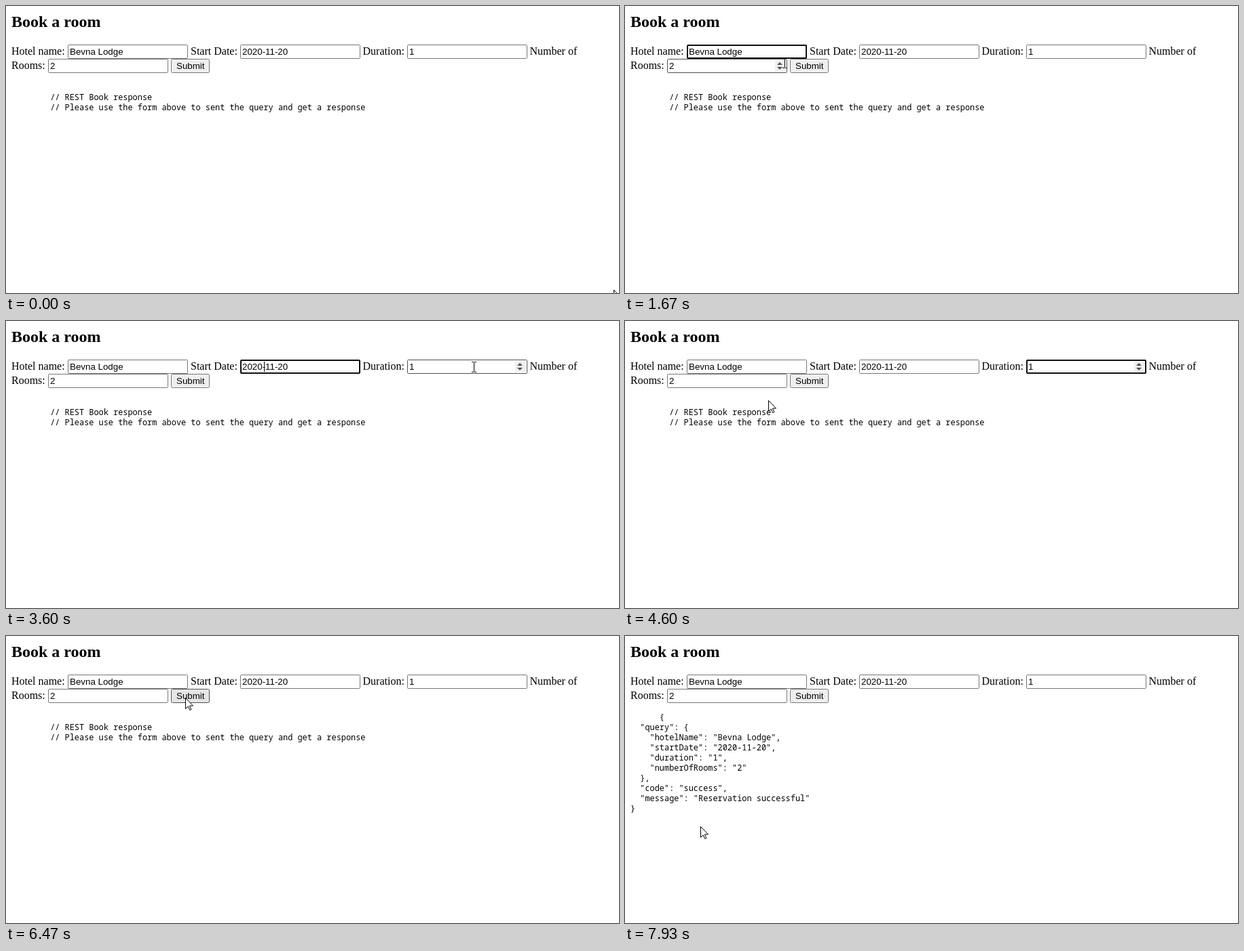
An HTML page for the animation above (8 s loop, 903 by 424 pixels).

```html
<!DOCTYPE html>
<html lang="en">
<head>
<meta charset="utf-8">
<title>Book a room</title>
<style>
  html, body { margin: 0; width: 100%; height: 100%; overflow: hidden; background: #fff; }
  svg { display: block; width: 903px; height: 424px; }
  text { white-space: pre; }
  .label { font: 16px "Liberation Serif", "Times New Roman", serif; }
  .title { font: bold 24px "Liberation Serif", "Times New Roman", serif; }
  .value { font: 13.333px "Liberation Sans", Arial, sans-serif; }
  .code { font: 11.92px "Noto Sans Mono", monospace; }
  .box { fill: #fff; stroke: #767676; }
  .hover .box { stroke: #4f4f4f; }
  .ring { fill: none; stroke: #101010; stroke-width: 2; visibility: hidden; }
  .focus .ring { visibility: visible; }
  .spin { visibility: hidden; }
  .hover .spin, .focus .spin { visibility: visible; }
  #button .box { fill: #efefef; }
  #button.hover .box { fill: #e5e5e5; }
  #button.active .box { fill: #f5f5f5; stroke: #8d8d8d; }
</style>
</head>
<body>
<svg viewBox="0 0 903 424">
  <text class="title" x="8" y="31">Book a room</text>
  <g class="label">
    <text x="8" y="72">Hotel name:</text>
    <text x="272" y="72">Start Date:</text>
    <text x="525.5" y="72">Duration:</text>
    <text x="771.5" y="72">Number of</text>
    <text x="8" y="93">Rooms:</text>
  </g>
  <g id="fields"></g>
  <g id="button">
    <rect class="box" x="243.5" y="78.5" width="56" height="20" rx="2"/>
    <text class="value" x="251" y="93">Submit</text>
  </g>
  <g id="hint" class="code"></g>
  <g id="reply" class="code"></g>
  <rect id="caret" width="1" height="15"/>
  <path id="arrow" d="M.5 .5V16.5L4.2 13l2.5 5.6 2.2-1L6.4 12.1h5.1z" fill="#fff" stroke="#000"/>
  <path id="beam" d="M-3-7.5H0M1-7.5H4M-3 7.5H0M1 7.5H4M.5-7V7" fill="none" stroke="#000"/>
</svg>
<script>
const $ = id => document.getElementById(id);
const LOOP = 8000, FPS = 15, W = 177, H = 21;

const fields = [
  { x: 91, y: 57, value: 'Bevna Lodge', caret: 133 },
  { x: 345, y: 57, value: '2020-11-20', caret: 380 },
  { x: 591, y: 57, value: '1', caret: 602, number: true },
  { x: 62, y: 78, value: '2', caret: 73, number: true }
];

const spinner = (x, y) => `<g class="spin">
  <rect x="${x}" y="${y}" width="15" height="15" fill="#efefef"/>
  <path d="M${x + 3} ${y + 6}l4-4 4 4zM${x + 3} ${y + 9}h8l-4 4z" fill="#505050"/></g>`;

$('fields').innerHTML = fields.map(f => `<g>
  <rect class="box" x="${f.x + .5}" y="${f.y + .5}" width="${W - 1}" height="${H - 1}" rx="1"/>
  <text class="value" x="${f.x + 3}" y="${f.y + 15}">${f.value}</text>
  ${f.number ? spinner(f.x + 159, f.y + 3) : ''}
  <rect class="ring" x="${f.x + 1}" y="${f.y + 1}" width="${W - 2}" height="${H - 2}" rx="1.5"/></g>`).join('');
fields.forEach((f, i) => f.node = $('fields').children[i]);

const hint = ['        // REST Book response',
  '        // Please use the form above to sent the query and get a response'];
const query = {
  hotelName: fields[0].value, startDate: fields[1].value,
  duration: fields[2].value, numberOfRooms: fields[3].value
};
const reply = ('      ' + JSON.stringify(
  { query, code: 'success', message: 'Reservation successful' }, null, 2)).split('\n');

function writeLines(id, lines, y) {
  $(id).innerHTML = lines.map((s, i) => `<text x="8" y="${y + 15 * i}">${s}</text>`).join('');
}
writeLines('hint', hint, 139);
writeLines('reply', reply, 124);

// start, end, then the three points of a quadratic curve
const moves = [
  [0, 860, 895, 419, 514, 244, 134, 69],
  [1260, 2190, 134, 69, 258, 99, 382, 73],
  [2860, 3590, 382, 73, 540, 127, 689, 68],
  [4130, 4590, 689, 68, 420, 240, 211, 117],
  [4590, 4790, 211, 117, 186, 98, 170, 89],
  [5330, 6190, 170, 89, 218, 198, 264, 93],
  [6190, 6460, 264, 93, 264, 92, 264, 91],
  [7200, 7920, 264, 91, 205, 170, 111, 281]
];
// time and index of the focused field
const clicks = [[1060, 0], [2460, 1], [3730, 2], [5060, 3], [6330, -1]];
const PRESS = 6330, RELEASE = 6460, REPLY = 7395;

const lastBefore = (list, t) => list.filter(e => e[0] <= t).pop();
const inside = (p, x, y, w, h) => p.x >= x && p.x < x + w && p.y >= y && p.y < y + h;

function pointer(t) {
  const [a, b, x0, y0, x1, y1, x2, y2] = lastBefore(moves, t);
  const k = Math.min(1, (t - a) / (b - a)), u = k * k * (3 - 2 * k), v = 1 - u;
  const curve = (p, q, r) => Math.round(v * v * p + 2 * u * v * q + u * u * r);
  return { x: curve(x0, x1, x2), y: curve(y0, y1, y2) };
}

function overText(p, replied) {
  const lines = replied ? reply : hint, top = replied ? 112 : 127;
  const line = lines[Math.floor((p.y - top) / 15)];
  return line !== undefined && p.x >= 8 && p.x < 8 + line.length * 7.15 ||
    inside(p, 8, 58, 835, 18) || inside(p, 8, 79, 50, 18);
}

const show = (id, on) => $(id).setAttribute('visibility', on ? 'visible' : 'hidden');

function draw(now) {
  const t = Math.floor((now % LOOP) * FPS / 1000 + .06) * 1000 / FPS;
  const p = pointer(t), click = lastBefore(clicks, t), focus = click ? click[1] : -1;
  const replied = t >= REPLY;
  let onField = false;

  fields.forEach((f, i) => {
    const hover = inside(p, f.x, f.y, W, H);
    onField = onField || hover;
    f.node.classList.toggle('hover', hover);
    f.node.classList.toggle('focus', i === focus);
  });

  const onButton = inside(p, 243, 78, 57, H);
  $('button').classList.toggle('hover', onButton);
  $('button').classList.toggle('active', t >= PRESS && t < RELEASE);
  show('hint', !replied);
  show('reply', replied);

  const f = fields[focus];
  show('caret', f && (t - click[0]) % 1000 < 500);
  if (f) {
    $('caret').setAttribute('x', f.caret);
    $('caret').setAttribute('y', f.y + 3);
  }

  const beam = onField || !onButton && overText(p, replied);
  show('beam', beam);
  show('arrow', !beam);
  $(beam ? 'beam' : 'arrow').setAttribute('transform', `translate(${p.x} ${p.y})`);
}

function tick() {
  draw(performance.now());
  requestAnimationFrame(tick);
}
tick();
</script>
</body>
</html>
```
